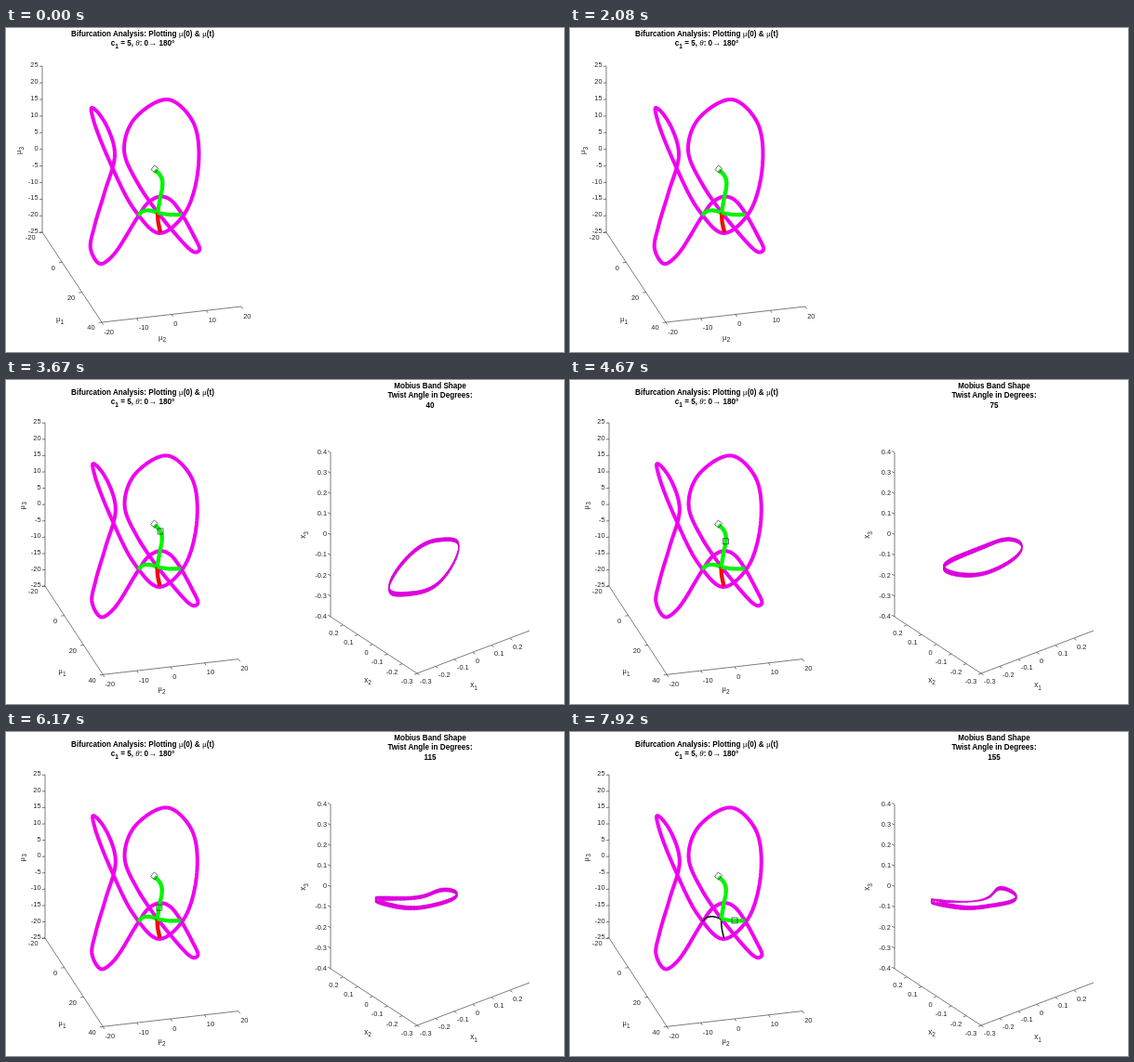
Animation, 600 px wide and 349 px high, one loop 8 s. Source, as an HTML page:

```html
<!DOCTYPE html>
<html lang="en">
<head>
<meta charset="utf-8">
<title>Bifurcation Analysis</title>
<style>
html, body { margin: 0; width: 100%; height: 100%; overflow: hidden; background: #fff; }
svg { display: block; width: 100vw; height: 100vh; }
text { font: 7.4px "Liberation Sans", Arial, sans-serif; fill: #262626; }
.title { font-size: 8.15px; font-weight: bold; fill: #000; text-anchor: middle; }
.label { font-size: 8.15px; text-anchor: middle; }
.sym { font-family: "Liberation Serif", Times, serif; font-weight: normal; font-size: 9px; }
.sub { font-size: 6.5px; }
.axis { fill: none; stroke: #262626; stroke-width: .6; }
.curve { fill: none; stroke-linejoin: round; }
.marker { fill: none; stroke: #333; stroke-width: .7; }
.band { fill: #e600e6; stroke: #7a067a; stroke-width: .6; stroke-linejoin: round; }
</style>
</head>
<body>
<svg id="stage" viewBox="0 0 600 349"></svg>
<script>
const LOOP = 8000, SPLIT = 2830, BRANCH = 145;
const stage = document.getElementById('stage');

// [time in ms, twist angle]
const TWIST = [[SPLIT, 0], [3670, 40], [4670, 75], [5580, 100], [6830, 135], [7920, 155]];

// [angle, x, y] of the moving marker
const MARK = [[0, 160, 153], [40, 166.6, 160], [75, 168, 171], [100, 166.6, 180.4],
  [BRANCH, 163, 199], [155, 177.9, 200.7]];

const LOOPS = '92,86 97,89 109,107 117,136 106,177 95,214 91,238 101,254 114,246 142,203 ' +
  '153,188 166,181.5 178,186 202,224 208,239 203,241.5 178,217 141,166 127,131 138,98 ' +
  '174,77 201,101 207,148 192,200 165,221 139,197 112,145 94,99';
const STEM = '160,153 165,157.5 168,164 168,172 166,182 163,199';
const LEFT = '142,202 147,197.5 154,196.5 163,199';
const RIGHT = '163,199 175,201 189,201';
const DOWN = '163,199 163.7,209 166,220';

// Harmonics of the band's centre line: [angle, x terms, y terms],
// each as mean, cos, sin, cos 2, sin 2, sin 3
const BAND = [
  [0, 457, 0, 32, 0, 0, 0, 210, -35, -12, 0, 0, 0],
  [40, 451.4, 3.3, 35.9, 2, -.8, -1.6, 201, -26.6, -17.9, -.3, .3, 2.7],
  [75, 446.4, 8, 39, 2, -2.2, -2.6, 191.2, -17.2, -8.8, .9, -1, .2],
  [100, 444.9, 9, 39.9, 2.7, -3, -3.1, 183.8, -10.8, -4.9, 1.3, -1.8, -.4],
  [135, 443.8, 8.1, 39.4, 2.5, -3.5, -4.1, 174.6, -3, -.2, 3.6, -2.5, -1.2],
  [155, 440, 9.4, 39.5, 5, -4.5, -5.5, 180.9, -7.4, -3.7, 1, -3.3, -1.7]
];

function add(parent, tag, attrs, html) {
  const el = document.createElementNS('http://www.w3.org/2000/svg', tag);
  for (const k in attrs) el.setAttribute(k, attrs[k]);
  if (html !== undefined) el.innerHTML = html;
  parent.appendChild(el);
  return el;
}
const parse = s => s.split(' ').map(p => p.split(',').map(Number));
const range = (n, from, step) => Array.from({ length: n }, (_, i) => +(from + i * step).toFixed(1) || 0);

// Piecewise linear lookup; the first column is the key.
function lookup(rows, key) {
  let i = 0;
  while (i < rows.length - 2 && key >= rows[i + 1][0]) i++;
  const a = rows[i], b = rows[i + 1], t = (key - a[0]) / (b[0] - a[0]);
  return a.map((v, k) => v + (b[k] - v) * t).slice(1);
}

// Centripetal Catmull-Rom samples through the points.
function spline(pts, closed, steps = 12) {
  const n = pts.length, out = [];
  const mirror = (p, q) => p.map((v, k) => 2 * v - q[k]);
  const at = i => closed ? pts[(i + n) % n]
    : i < 0 ? mirror(pts[0], pts[1])
    : i >= n ? mirror(pts[n - 1], pts[n - 2]) : pts[i];
  const gap = (p, q) => Math.sqrt(Math.hypot(q[0] - p[0], q[1] - p[1]));
  for (let i = 0; i < (closed ? n : n - 1); i++) {
    const [a, b, c, d] = [at(i - 1), at(i), at(i + 1), at(i + 2)];
    const u = gap(a, b), v = gap(b, c), w = gap(c, d);
    for (let s = 0; s < steps; s++) {
      const t = s / steps;
      out.push(b.map((p, k) => {
        const q = c[k];
        const m = v * ((p - a[k]) / u - (q - a[k]) / (u + v) + (q - p) / v);
        const e = v * ((q - p) / v - (d[k] - p) / (v + w) + (d[k] - q) / w);
        return p + t * (m + t * (3 * (q - p) - 2 * m - e + t * (2 * (p - q) + m + e)));
      }));
    }
  }
  if (!closed) out.push(pts[n - 1]);
  return out;
}
const path = pts => 'M' + pts.map(p => p[0].toFixed(2) + ' ' + p[1].toFixed(2)).join('L');

const sym = c => `<tspan class="sym">${c}</tspan>`;
const sub = c => `<tspan class="sub" dy="2.5">${c}</tspan>`;

// Ticks with labels along a line; o holds the tick vector, label offset and anchor.
function ticks(g, labels, start, step, o) {
  labels.forEach((s, i) => {
    const x = start[0] + step[0] * i, y = start[1] + step[1] * i;
    add(g, 'path', { class: 'axis', d: `M${x} ${y}l${o.tick}` });
    add(g, 'text', { x: x + o.dx, y: y + o.dy + 2.7, 'text-anchor': o.anchor }, s);
  });
}
function label(g, x, y, html, turn) {
  add(g, 'text', { class: 'label', transform: `translate(${x} ${y})` + (turn ? 'rotate(-90)' : '') }, html);
}
function title(g, x, y, html) {
  return add(g, 'text', { class: 'title', x, y }, html);
}

function leftPlot(small) {
  const g = add(stage, 'g', {});
  const by = ([x, y]) => small ? [.972 * x, .983 * y] : [x, y];
  const at = ([x, y]) => small ? [.972 * x + 4.1, .983 * y + 5.7] : [x, y];
  const top = small ? 7 : 0;
  title(g, 147, 9 + top, `Bifurcation Analysis: Plotting ${sym('μ')}(0) &amp; ${sym('μ')}(t)`);
  title(g, 147, 19 + top, `c${sub('1')}<tspan dy="-2.5"> = 5, </tspan>` +
    `<tspan class="sym" font-style="italic">θ</tspan>: 0${sym('→')} 180°`);

  const frame = parse('39,41 39,220 103,317 253,300').map(at);
  add(g, 'path', { class: 'axis', d: path(frame) });
  ticks(g, range(11, 25, -5), frame[0], by([0, 17.9]),
    { tick: '-3 .4', dx: -4.5, dy: -1.5, anchor: 'end' });
  ticks(g, range(4, -20, 20), frame[1], by([64 / 3, 97 / 3]),
    { tick: '-3.5 .4', dx: -7.5, dy: 5.5, anchor: 'end' });
  ticks(g, range(5, -20, 10), frame[2], by([37.5, -4.25]),
    { tick: '1.6 2.6', dx: 2.2, dy: 10, anchor: 'start' });
  label(g, ...at([16, 132]), sym('μ') + sub('3'), true);
  label(g, ...at([58, 316]), sym('μ') + sub('1'));
  label(g, ...at([168, 335.5]), sym('μ') + sub('2'));

  const curve = (pts, stroke, width, closed) => add(g, 'path', {
    class: 'curve', stroke, 'stroke-width': width,
    d: path(spline(parse(pts), closed).map(at)) + (closed ? 'Z' : '')
  });
  curve(LOOPS, '#f000f0', 4, true);
  curve(LEFT, '#000', 1.5);
  curve(DOWN, '#000', 1.5);
  const side = [curve(LEFT, '#00f400', 4.2), curve(DOWN, '#f00a0a', 4.4)];
  curve(RIGHT, '#00f400', 4.2);
  curve(STEM, '#00f400', 4.4);
  const [x, y] = at([160, 152.3]);
  add(g, 'path', { class: 'marker', d: `M${x - 4} ${y + .3}l3.6 -4.8l4.2 3.6l-3.6 4.8z` });
  const mark = small && add(g, 'rect', { class: 'marker', x: -3, y: -3, width: 6, height: 6 });
  return { g, at, side, mark };
}

function rightPlot() {
  const g = add(stage, 'g', {});
  title(g, 456, 9, 'Mobius Band Shape');
  title(g, 456, 19, 'Twist Angle in Degrees:');
  const count = title(g, 456, 29.5, '');
  add(g, 'path', { class: 'axis', d: 'M349 78V255L442 316L563 270' });
  ticks(g, range(9, .4, -.1), [349, 78], [0, 22.1],
    { tick: '-3 -1.5', dx: -4, dy: -.8, anchor: 'end' });
  ticks(g, range(6, -.3, .1), [442, 316], [-16, -10.4],
    { tick: '-3 1.2', dx: -4.5, dy: 8.3, anchor: 'end' });
  ticks(g, range(6, -.3, .1), [442, 316], [20, -7.5],
    { tick: '2.6 1.7', dx: 3, dy: 8.5, anchor: 'start' });
  label(g, 322, 167, 'x' + sub('3'), true);
  label(g, 389, 325.5, 'x' + sub('2'));
  label(g, 503, 331, 'x' + sub('1'));
  return { g, count, band: add(g, 'path', { class: 'band' }) };
}

// The band is a strip of quads; it turns edge-on near its clamp as the twist grows.
function bandPath(angle) {
  const h = lookup(BAND, angle), n = 72;
  const thin = 1.8 * Math.max(0, Math.min(1, (angle - 100) / 55));
  const sum = (k, a) => h[k] + h[k + 1] * Math.cos(a) + h[k + 2] * Math.sin(a) +
    h[k + 3] * Math.cos(2 * a) + h[k + 4] * Math.sin(2 * a) + h[k + 5] * Math.sin(3 * a);
  const edge = i => {
    const a = 2 * Math.PI * i / n;
    const half = 2 + .6 * Math.max(0, -Math.sin(a)) -
      thin * Math.max(0, Math.cos(a + Math.PI / 4)) ** 4;
    const x = sum(0, a), y = sum(6, a);
    return [[x, y - half], [x, y + half]];
  };
  let d = '';
  for (let i = 0; i < n; i++) {
    const [p, q] = edge(i), [r, s] = edge(i + 1);
    d += path([p, r, s, q]) + 'Z';
  }
  return d;
}

const show = (el, on) => el.setAttribute('visibility', on ? 'inherit' : 'hidden');
const wide = leftPlot(false), slim = leftPlot(true), right = rightPlot();
// Fill and edges are separate so that the quads' inner sides stay unseen.
right.band.style.stroke = '#d400d4';
let last = null;

function draw(t) {
  const angle = t < SPLIT ? -1 : Math.floor((lookup(TWIST, t)[0] + .5) / 5) * 5;
  if (angle === last) return;
  last = angle;
  const split = angle >= 0;
  wide.g.style.display = split ? 'none' : '';
  slim.g.style.display = right.g.style.display = split ? '' : 'none';
  if (!split) return;
  right.count.textContent = angle;
  right.band.setAttribute('d', bandPath(angle));
  slim.side.forEach(el => show(el, angle < BRANCH));
  slim.mark.setAttribute('transform', `translate(${slim.at(lookup(MARK, angle))})`);
}

const begin = performance.now();
function tick() {
  draw((performance.now() - begin) % LOOP);
  requestAnimationFrame(tick);
}
tick();
</script>
</body>
</html>
```
